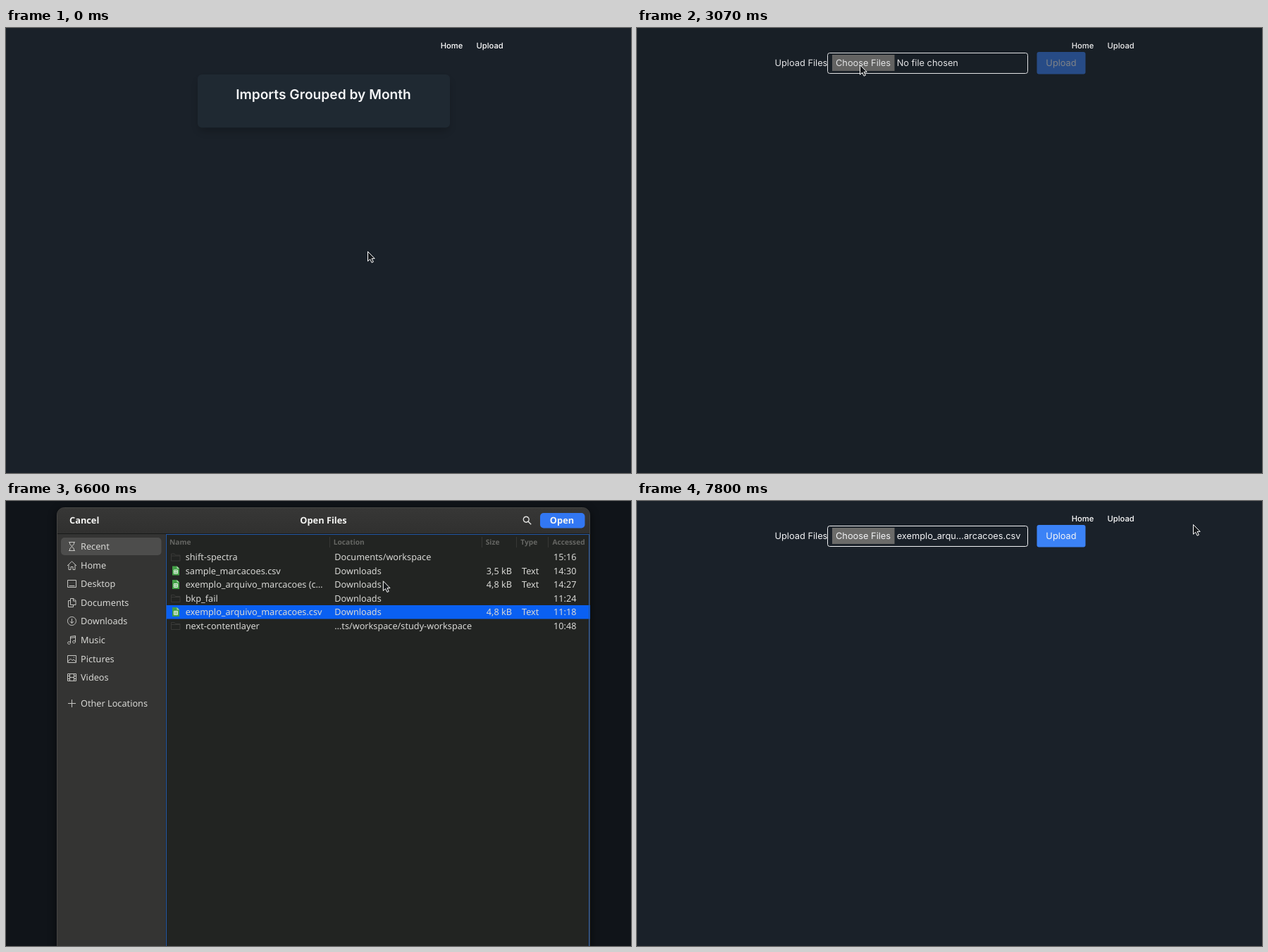
Animation, 887 px wide and 632 px high, one loop 8 s. Source, as an HTML page:

```html
<!DOCTYPE html>
<html lang="en">
<head>
<meta charset="utf-8">
<title>File upload</title>
<style>
html, body { margin: 0; width: 100%; height: 100%; overflow: hidden; background: #1a2129; }
svg { display: block; width: 887px; height: 632px; text-rendering: geometricPrecision; }
#page { font: 12.8px Inter, sans-serif; fill: #f3f4f6; }
#dialog { font: 12.7px "Noto Sans", "Open Sans", sans-serif; fill: #d8d8d5; }
.nav { font-size: 11.2px; font-weight: 500; fill: #fff; }
.title { font-size: 19.2px; font-weight: 600; }
.bold { font-size: 12.8px; font-weight: 700; fill: #f4f4f2; }
.head { font-size: 10.2px; font-weight: 700; fill: #656663; }
.icon { fill: none; stroke: #c6c6c3; stroke-width: 1; }
</style>
</head>
<body>
<svg id="stage" viewBox="0 0 887 632">
  <defs>
    <filter id="soft" x="-20%" y="-40%" width="140%" height="200%"><feGaussianBlur stdDeviation="6"/></filter>
    <linearGradient id="bar" x1="0" y1="0" x2="0" y2="1">
      <stop offset="0" stop-color="#373736"/><stop offset="1" stop-color="#30302f"/>
    </linearGradient>
  </defs>
  <g id="page"></g>
  <rect id="dim" width="887" height="632" fill="#000"/>
  <g id="dialog"></g>
  <path id="cursor" d="M.5 .5V14.2L3.7 11.3L6.1 16.2L8.4 15.1L6.1 10.4H10.2Z"
    fill="#15181b" stroke="#fff" stroke-linejoin="round"/>
</svg>
<script>
const LOOP = 8000;
const $ = id => document.getElementById(id);
const text = (x, y, str, attrs = '') => `<text x="${x}" y="${y}" ${attrs}>${str}</text>`;
const rect = (x, y, w, h, fill, attrs = '') =>
  `<rect x="${x}" y="${y}" width="${w}" height="${h}" fill="${fill}" ${attrs}/>`;
const path = (x, y, d, attrs = 'class="icon"') =>
  `<path transform="translate(${x} ${y})" d="${d}" ${attrs}/>`;

function pageMarkup() {
  return `<g id="home">
    ${rect(274, 74, 354, 72, '#000', 'rx="6" opacity=".22" filter="url(#soft)"')}
    ${rect(272, 66, 358, 75.5, '#1f2932', 'rx="6"')}
    ${text(450.5, 101, 'Imports Grouped by Month', 'class="title" text-anchor="middle"')}
  </g>
  <g id="upload">
    ${text(195.5, 54, 'Upload Files')}
    ${rect(270.5, 35.5, 284, 29, 'none', 'rx="3" stroke="#f3f4f6"')}
    ${rect(277, 38, 88.5, 23, '#6b6b69')}
    ${text(282, 54, 'Choose Files')}
    ${text(368.7, 54, '', 'id="chosen"')}
    <g id="send">${rect(567.5, 34, 69, 31.5, '#3b82f6', 'rx="3"')}
      ${text(602, 54, 'Upload', 'text-anchor="middle"')}</g>
  </g>
  ${text(616.7, 29, 'Home', 'class="nav"')}${text(667.5, 29, 'Upload', 'class="nav"')}`;
}

// Sidebar entries: label and a 13 px line icon
const places = [
  ['Recent', 'M2 .5H11M2 12.5H11M3.5 .5V3L9.5 10V12.5M9.5 .5V3L3.5 10V12.5'],
  ['Home', 'M0 7L6.5 .8L13 7M2 5.5V12.5H5V8.5H8V12.5H11V5.5'],
  ['Desktop', 'M.5 1.5H12.5V11.5H.5ZM2.5 9.5H10.5'],
  ['Documents', 'M4.5 .5H9L12 3.5V9.5H4.5ZM8.5 .5V4H12M4.5 3.5H1.5V12.5H8.5V9.5'],
  ['Downloads', 'M6.5 .5A6 6 0 1 1 6.4 .5ZM6.5 3V9.5M3.8 7L6.5 9.7L9.2 7'],
  ['Music', 'M4.5 10.5V1.5L11.5 .5V9M4.5 3.5L11.5 2.5M4.5 10.5A2 1.7 0 1 1 4.4 10M11.5 9A2 1.7 0 1 1 11.4 8.6'],
  ['Pictures', 'M.5 1.5H12.5V11.5H.5ZM1 10L4.5 6L7 8.5L9 7L12 10M9 4H10'],
  ['Videos', 'M.5 1.5H12.5V11.5H.5ZM3.5 1.5V11.5M9.5 1.5V11.5M3.5 6.5H9.5M.5 4.5H3.5M.5 8.5H3.5M9.5 4.5H12.5M9.5 8.5H12.5']
];

// Files: name, location, size, time; entries without a size are folders
const files = [
  ['shift-spectra', 'Documents/workspace', '', '15:16'],
  ['sample_marcacoes.csv', 'Downloads', '3,5 kB', '14:30'],
  ['exemplo_arquivo_marcacoes (c…', 'Downloads', '4,8 kB', '14:27'],
  ['bkp_fail', 'Downloads', '', '11:24'],
  ['exemplo_arquivo_marcacoes.csv', 'Downloads', '4,8 kB', '11:18'],
  ['next-contentlayer', '…ts/workspace/study-workspace', '', '10:48']
];

const columns = [['Name', 232], ['Location', 464.8], ['Size', 680.7], ['Type', 730.3], ['Accessed', 775.5]];

function fileRow([name, place, size, time], i) {
  const mid = 79.5 + 19.5 * i, base = mid + 4.5;
  const icon = size
    ? path(235, mid - 6.5, 'M1 0H7.5L11 3.5V13H1Z', 'fill="#43a047"') +
      path(235, mid - 6.5, 'M7.5 0V3.5H11Z', 'fill="#a5d6a7"') +
      path(235, mid - 6.5, 'M3.5 5.5H8.5V10.5H3.5ZM3.5 8H8.5M6 5.5V10.5', 'fill="none" stroke="#e8f5e9"')
    : path(234, mid - 6, 'M.5 11.5V1.5H5L6.5 3.5H13V11.5ZM.5 4.5H13', 'fill="none" stroke="#383937"');
  return icon + text(254.7, base, name) + text(466.3, base, place) +
    (size ? text(718, base, size, 'text-anchor="end"') + text(732, base, 'Text') : '') +
    text(809.5, base, time, 'text-anchor="end"');
}

function dialogMarkup() {
  const side = places.map(([label, icon], i) => {
    const mid = 64.5 + 26.6 * i;
    return path(87, Math.round(mid - 6.5), icon) + text(106, mid + 4.5, label);
  }).join('');
  const heads = columns.map(([label, x], i) =>
    text(x, 62, label, `class="head" ${i ? '' : 'id="nameHead"'}`) +
    (i ? rect([459, 675, 724, 769][i - 1], 51, 1, 15, '#373836') : '')).join('');
  return `${rect(70, 11, 761, 700, '#000', 'rx="12" opacity=".4" filter="url(#soft)"')}
    ${rect(72.5, 9.5, 756, 720, '#343433', 'rx="10" stroke="#454543"')}
    ${path(73, 10, 'M0 37V10Q0 0 10 0H745Q755 0 755 10V37Z', 'fill="url(#bar)"')}
    ${rect(73, 46, 755, 1, '#191a19')}
    ${rect(227, 47, 601, 680, '#222422')}
    ${rect(226, 47, 1, 680, '#2b2b2a')}
    ${rect(78, 52, 142.5, 25, '#4d4d4c', 'rx="5"')}
    ${side}
    ${path(87, 281, 'M6.5 1V12M1 6.5H12')}${text(106, 292, 'Other Locations')}
    ${text(90, 32, 'Cancel', 'class="bold"')}
    ${text(450.5, 32, 'Open Files', 'class="bold" text-anchor="middle"')}
    ${path(733, 21, 'M5.3 1.2A4 4 0 1 1 5.2 1.2ZM8.2 8.2L12.2 12.2', 'class="icon" style="stroke:#e4e4e2;stroke-width:1.4"')}
    ${rect(758, 17, 63.5, 21.5, '#3d3d3c', 'rx="5"')}
    ${text(789, 32, 'Open', 'class="bold" style="fill:#626261" text-anchor="middle"')}
    <g id="open">${rect(758, 17, 63.5, 21.5, '#3277f2', 'rx="5"')}
      ${text(789, 32, 'Open', 'class="bold" text-anchor="middle"')}</g>
    ${heads}
    ${rect(227, 148, 602, 19.5, '#0a60f2', 'id="selected"')}
    ${files.map(fileRow).join('')}
    ${rect(227.5, 47.5, 600, 680, 'none', 'id="ring" stroke="#2358a6"')}`;
}

// Pointer stops: time, x, y; a repeated place is a rest
const stops = [
  [0, 513, 317], [210, 513, 317], [300, 517, 308], [670, 620, 150], [900, 690, 55], [1070, 682, 30],
  [1270, 682, 30], [1400, 688, 28], [1620, 688, 28], [1730, 690, 27], [2130, 690, 27],
  [2200, 674, 38], [2500, 505, 63], [2780, 345, 61], [2930, 316, 52], [4200, 316, 52],
  [4270, 319, 56], [4650, 352, 110], [5070, 385, 155], [5140, 387, 158], [6265, 387, 158],
  [6400, 420, 147], [6750, 620, 88], [7130, 788, 35], [7200, 789, 34], [7470, 789, 34],
  [7530, 789, 33], [LOOP, 789, 33]
];

function slope(i, axis) {
  const a = stops[i - 1], b = stops[i], c = stops[i + 1];
  const same = (p, q) => p[1] === q[1] && p[2] === q[2];
  if (!a || !c || same(a, b) || same(b, c)) return 0;
  return (c[axis] - a[axis]) / (c[0] - a[0]);
}

function pointer(t) {
  const i = stops.findIndex((s, k) => k < stops.length - 1 && t < stops[k + 1][0]);
  const a = stops[i], b = stops[i + 1], span = b[0] - a[0], u = (t - a[0]) / span;
  return [1, 2].map(n =>
    a[n] * (1 + 2 * u) * (1 - u) ** 2 + b[n] * u * u * (3 - 2 * u) +
    span * (slope(i, n) * u * (1 - u) ** 2 - slope(i + 1, n) * u * u * (1 - u)));
}

const ramp = (t, from, to) => Math.min(1, Math.max(0, (t - from) / (to - from)));
const easeOut = u => 1 - (1 - u) ** 2;
const show = (id, on) => $(id).setAttribute('display', on ? 'inline' : 'none');
const fade = (id, v) => $(id).setAttribute('opacity', v.toFixed(3));

function draw(t) {
  const [x, y] = pointer(t);
  $('cursor').setAttribute('transform', `translate(${x.toFixed(2)} ${y.toFixed(2)})`);

  show('home', t < 1670);
  show('upload', t >= 1670);
  const chosen = t >= 7600;
  $('chosen').textContent = chosen ? 'exemplo_arqu…arcacoes.csv' : 'No file chosen';
  fade('send', chosen ? 1 : 0.5);

  fade('dim', 0.4 * (ramp(t, 3020, 3310) - ramp(t, 7480, 7740)));
  const grow = easeOut(ramp(t, 3075, 3268)) * (1 - easeOut(ramp(t, 7475, 7590)));
  show('dialog', grow > 0);
  $('dialog').setAttribute('transform', `translate(0 ${(360 * (1 - grow)).toFixed(2)}) scale(1 ${grow.toFixed(4)})`);

  $('nameHead').style.fill = y < 68 && x < 459 ? '#1d51c4' : '';
  show('selected', t >= 5330);
  fade('open', ramp(t, 5290, 5470));
  show('ring', t < 7110);
}

$('page').innerHTML = pageMarkup();
$('dialog').innerHTML = dialogMarkup();

const start = performance.now();
function tick() {
  draw((performance.now() - start) % LOOP);
  requestAnimationFrame(tick);
}
tick();
</script>
</body>
</html>
```
